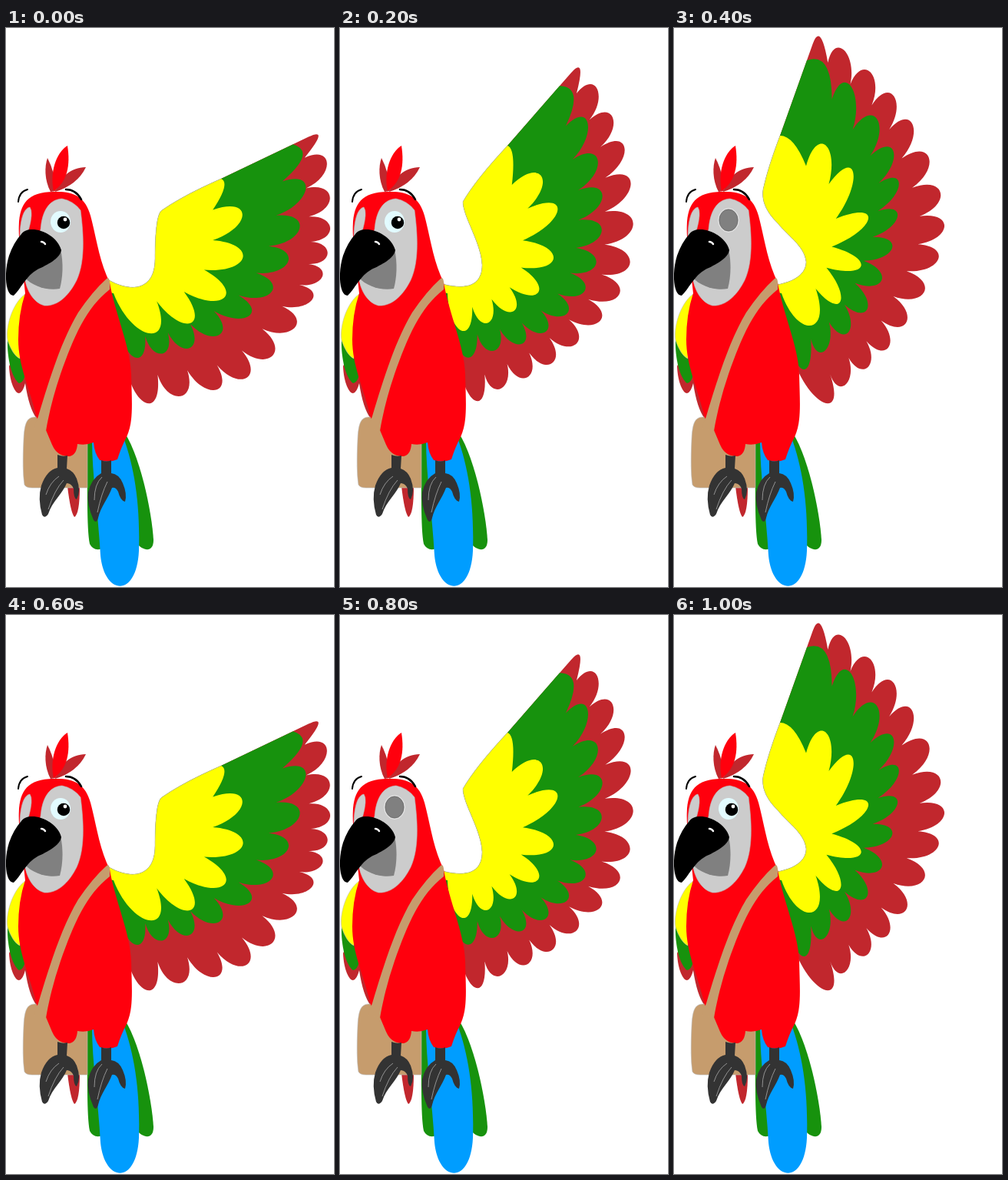
Animation, 427 px wide and 727 px high, one loop 1.2 s. Source, as an HTML page:

```html
<!DOCTYPE html>
<html lang="en">
<head>
<meta charset="utf-8">
<title>Waving parrot</title>
<style>
html, body { margin: 0; width: 100%; height: 100%; overflow: hidden; background: #fff; }
svg { display: block; width: 100%; height: 100%; }
.red { fill: #ff000d; }
.crimson { fill: #c1272d; }
.green { fill: #17920d; }
.yellow { fill: #ff0; }
.blue { fill: #009dff; }
.tan { fill: #c69c6d; }
.face { fill: #ccc; }
.grey { fill: #808080; }
.dark { fill: #333; }
.line { fill: none; stroke: #000; stroke-linecap: round; }
.claw { fill: none; stroke: #aaa; stroke-width: .8; }
.thin { stroke: #bbb; stroke-width: .6; }
</style>
</head>
<body>
<svg viewBox="0 0 427 727">
  <g id="wing"></g>

  <g id="tail">
    <path class="green" d="M106 538C106 600 105 650 109 671Q114 681 126 677L130 540Z"/>
    <path class="green" d="M150 520C174 550 190 630 192 666C192 683 178 680 170 670L145 540Z"/>
    <path class="blue" d="M112 535C112 582 120 630 123 686C128 738 170 742 173 680C175 615 166 565 150 525Z"/>
    <path class="crimson" d="M80 596Q84 630 89 636Q96 632 96 596Z"/>
  </g>

  <g id="far-wing">
    <path class="crimson" d="M4 440C5 462 12 475 17 475Q22 474 25 462Q30 495 40 508L46 490L22 400Z"/>
    <path class="green" d="M2 405C1 430 8 456 17 462Q23 461 25 450L20 395Z"/>
    <path class="yellow thin" d="M25 346C8 358 -1 390 2 406Q9 426 18 430L30 380Z"/>
  </g>

  <path class="tan thin" d="M40 506C28 505 24 512 23 535Q21 575 24 594Q26 598 34 598H106V520Z"/>
  <path class="red" d="M17 272C15 235 22 213 62 213C88 212 103 219 110 244C118 274 121 302 135 331C142 372 162 414 163 450C164 490 166 512 157 532Q150 545 145 561Q134 566 122 562Q115 553 114 539Q104 543 93 541Q92 555 83 557Q67 558 60 542L52 523L40 507C30 465 16 440 16 405Q16 372 25 345Z"/>
  <path class="tan" d="M131 326Q136 322 135 340C104 364 88 402 71 450Q58 488 52 524L36 520L42 505C58 452 73 405 94 370Q113 342 131 326Z"/>

  <g id="crest">
    <path class="crimson" d="M58 213C50 198 50 180 54 169Q64 188 65 212Z"/>
    <path class="crimson" d="M64 213C70 193 84 182 104 181Q93 204 64 213Z"/>
    <path class="red" d="M62 212C57 190 64 163 80 153C84 178 80 200 62 212Z"/>
  </g>
  <path class="line" stroke-width="2" d="M16 226Q17 213 28 210"/>
  <path class="line" stroke-width="2.6" d="M78 210Q91 210 98 223"/>

  <path class="face thin" d="M18 274C18 252 22 235 31 233Q36 240 29 264Z"/>
  <path class="face thin" d="M45 262C47 238 56 223 73 222Q88 225 97 237C102 275 102 306 92 328C81 350 66 362 50 361C35 357 25 340 23 316Z"/>
  <path class="grey" d="M71 288C75 305 74 325 70 339C54 342 34 336 24 324L40 304Z"/>
  <path d="M20 268C30 254 66 266 72 289C70 300 54 308 41 314C26 322 19 340 10 348C-1 348 -3 318 4 296Q10 279 20 268Z"/>
  <path fill="none" stroke="#fff" stroke-width="2.4" stroke-linecap="round" d="M46 278Q49 278 51 281"/>

  <g id="open">
    <ellipse cx="71" cy="252" rx="13" ry="14" fill="#e2fbff"/>
    <circle cx="75" cy="253" r="8.2"/>
    <circle cx="77" cy="249" r="2.4" fill="#fff"/>
  </g>
  <g id="shut">
    <ellipse class="face" cx="71" cy="250" rx="13.5" ry="15.5" stroke="#e4e4e4"/>
    <ellipse class="grey" cx="71" cy="250" rx="12" ry="14" stroke="#666" stroke-width=".8"/>
  </g>

  <g id="feet">
    <path class="dark" d="M67 555Q74 558 80 556L79 573Q88 576 92 586Q98 602 92 613Q88 612 88 599Q85 592 79 592C74 605 60 616 55 632Q50 639 47 633Q41 612 46 595Q53 575 67 572Z"/>
    <path class="claw" d="M69 583Q57 591 52 607M75 588Q63 601 55 626"/>
    <path class="dark" d="M124 562Q131 565 137 562L137 579Q147 580 152 592Q158 606 155 616Q149 615 146 603Q143 597 138 598C133 612 123 623 120 637Q118 645 114 640Q105 620 107 604Q111 586 124 579Z"/>
    <path class="claw" d="M125 584Q115 593 115 614M132 590Q124 606 119 630"/>
  </g>
</svg>
<script>
// Per pose: leading edge, and per layer the feather count and key points of the curve through the tips.
const poses = [{
  lead: "M110 340L134 328C165 345 194 340 194 300C194 270 196 241 203 237Q230 218 ", edge: [280, 196],
  crimson: [13, [414, 132], [422, 260], [398, 354], [313, 455], [181, 487]],
  green: [10, [396, 158], [379, 272], [332, 360], [248, 413], [167, 428]],
  yellow: [6, [289, 200], [310, 255], [300, 327], [252, 378], [186, 397]]
}, {
  lead: "M110 340L134 333C165 341 185 335 185 308C184 280 160 245 160 226Q176 198 ", edge: [218, 153],
  crimson: [14, [315, 42], [373, 167], [372, 327], [284, 430], [175, 484]],
  green: [12, [309, 76], [341, 207], [327, 325], [260, 400], [164, 428]],
  yellow: [8, [226, 156], [281, 224], [270, 325], [218, 373], [157, 393]]
}, {
  lead: "M110 340L134 334C160 329 172 318 172 304C170 284 150 272 135 254C119 238 114 224 116 210Q122 182 ", edge: [138, 140],
  crimson: [15, [188, 0], [299, 106], [352, 258], [291, 400], [195, 487]],
  green: [12, [196, 34], [282, 150], [288, 266], [246, 374], [166, 443]],
  yellow: [7, [151, 140], [217, 165], [253, 248], [232, 336], [178, 387]]
}];
// Where each layer leaves the leading edge, and where it ends behind the body.
const layers = {
  crimson: { from: .85, end: [155, 430] },
  green: { from: .7, end: [148, 385] },
  yellow: { from: 0, end: [140, 345] }
};
const pivot = [165, 290];

const mix = (a, b, t) => a.map((v, i) => v + (b[i] - v) * t);

// Catmull-Rom curve through the keys, u from 0 to 1.
function along(keys, u) {
  const last = keys.length - 1;
  const i = Math.min(last - 1, Math.floor(u * last)), t = u * last - i;
  const b = keys[i], c = keys[i + 1];
  const a = keys[i - 1] || mix(c, b, 2), d = keys[i + 2] || mix(b, c, 2);
  return b.map((v, k) => v + t / 2 * (c[k] - a[k] +
    t * (2 * a[k] - 5 * v + 4 * c[k] - d[k] + t * (3 * (v - c[k]) + d[k] - a[k]))));
}

// Gap between two tips, cut toward the shoulder in proportion to their spacing.
function notch(p, q) {
  const mid = mix(p, q, .5);
  const depth = .7 * Math.hypot(q[0] - p[0], q[1] - p[1]);
  return mix(mid, pivot, depth / Math.hypot(mid[0] - pivot[0], mid[1] - pivot[1]));
}

function feathers(pose, name) {
  const [count, ...keys] = pose[name], { from, end } = layers[name];
  const tips = Array.from({ length: count }, (_, i) => along(keys, i / (count - 1)));
  const gaps = tips.map((tip, i) => i < count - 1 ? notch(tip, tips[i + 1]) : end);
  const start = mix(pose.edge, pose.crimson[1], from);
  let d = `${pose.lead}${pose.edge}L${start}Q${mix(start, tips[0], 1.4)} ${gaps[0]}`;
  for (let i = 1; i < count; i++) {
    const a = gaps[i - 1], b = gaps[i], mid = mix(a, b, .5);
    const lift = p => p.map((v, k) => v + (tips[i][k] - mid[k]) * 4 / 3);
    d += `C${lift(a)} ${lift(b)} ${b}`;
  }
  return `<path class="${name}" d="${d}Z"/>`;
}

const byId = id => document.getElementById(id);
const show = (el, on) => { el.style.display = on ? "" : "none"; };

byId("wing").innerHTML = poses.map(pose =>
  `<g>${Object.keys(layers).map(name => feathers(pose, name)).join("")}
  <path class="thin" fill="none" d="${pose.lead}${pose.edge}"/></g>`).join("");
const wings = [...byId("wing").children];

function draw(now) {
  const step = Math.floor(now % 1200 / 200);
  const blink = step === 2 || step === 4;
  wings.forEach((wing, i) => show(wing, i === step % 3));
  show(byId("open"), !blink);
  show(byId("shut"), blink);
}

const start = performance.now();
function tick() {
  draw(performance.now() - start);
  requestAnimationFrame(tick);
}
tick();
</script>
</body>
</html>
```
